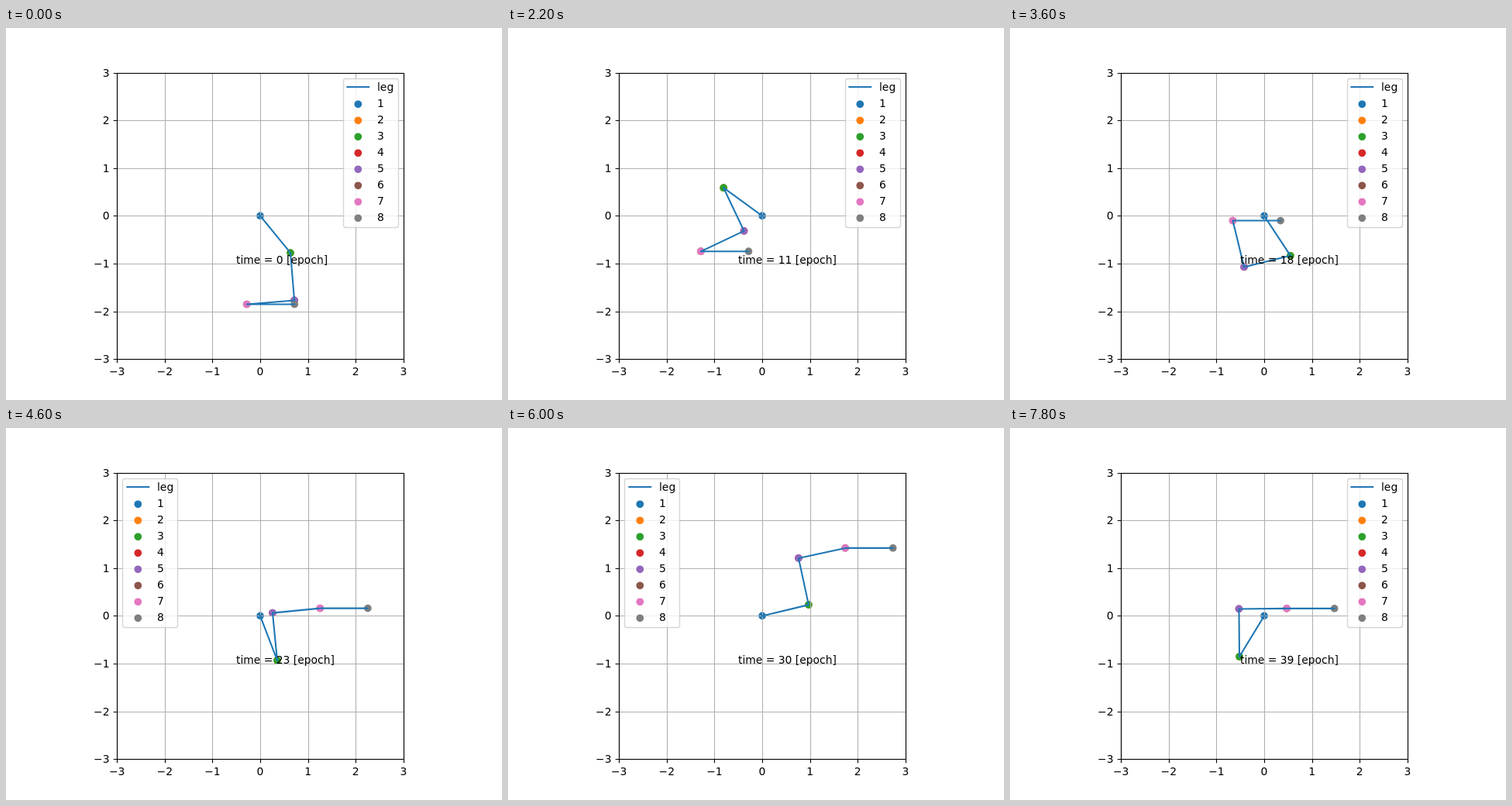
An HTML page for the animation above (8 s loop, 640 by 480 pixels).

```html
<!DOCTYPE html>
<html lang="en">
<head>
<meta charset="utf-8">
<title>Leg</title>
<style>
html, body { margin: 0; width: 100%; height: 100%; overflow: hidden; background: #fff; }
svg { display: block; width: 640px; height: 480px; }
text { font: 13.889px "DejaVu Sans", sans-serif; fill: #000; }
</style>
</head>
<body>
<svg id="stage" viewBox="0 0 640 480"></svg>
<script>
const UNIT = 61.6, CX = 328, CY = 242.4;
const BLUE = '#1f77b4';
const COLORS = [BLUE, '#ff7f0e', '#2ca02c', '#d62728', '#9467bd', '#8c564b', '#e377c2', '#7f7f7f'];
const EPOCH_MS = 200, EPOCHS = 40;

// epoch, angle of link 1, angle of link 2 (degrees)
const POSES = [
  [0, -50.7, -85.3], [3, 60, 60], [6, 40, -30], [7, 156, -7],
  [9, 116, -50], [12, 158, -72], [14, 178.1, -21.8], [18, -56.6, 193.7],
  [20, -75, 315], [23, -69.1, 455.6], [26, -100, 510], [30, 13.4, 462.2],
  [36, -140, 490], [39, -121.3, 450.5]
];

const stage = document.getElementById('stage');

function el(name, attrs, parent = stage, text) {
  const node = document.createElementNS('http://www.w3.org/2000/svg', name);
  for (const key in attrs) node.setAttribute(key, attrs[key]);
  if (text !== undefined) node.textContent = text;
  parent.appendChild(node);
  return node;
}

const px = x => CX + UNIT * x;
const py = y => CY - UNIT * y;
const snap = v => Math.floor(v + 0.5) + 0.5;
const dot = (color, parent, x = 0, y = 0) =>
  el('circle', { cx: x, cy: y, r: 4.86, fill: color }, parent);

const [L, R, T, B] = [px(-3), px(3), py(3), py(-3)].map(snap);
const clip = el('clipPath', { id: 'axes' }, el('defs', {}));
el('rect', { x: L, y: T, width: R - L, height: B - T }, clip);

const dotLayer = el('g', { 'clip-path': 'url(#axes)' });
const dots = COLORS.map(c => dot(c, dotLayer));

// Grid, ticks and tick labels
let grid = '', ticks = '';
for (let v = -3; v <= 3; v++) {
  const x = snap(px(v)), y = snap(py(v));
  const label = String(v).replace('-', '\u2212');
  grid += `M${x} ${T}V${B}M${L} ${y}H${R}`;
  ticks += `M${x} ${B}v4.86M${L} ${y}h-4.86`;
  el('text', { x: px(v), y: 448, 'text-anchor': 'middle' }, stage, label);
  el('text', { x: 133.5, y: Math.round(py(v) + 5), 'text-anchor': 'end' }, stage, label);
}
el('path', { d: grid, stroke: '#b0b0b0', 'stroke-width': 1.11 });
el('path', { d: ticks, stroke: '#000', 'stroke-width': 1.11 });

const legLayer = el('g', { 'clip-path': 'url(#axes)' });
const leg = el('polyline', {
  fill: 'none', stroke: BLUE, 'stroke-width': 2.083,
  'stroke-linejoin': 'round', 'stroke-linecap': 'square'
}, legLayer);
el('rect', {
  x: L, y: T, width: R - L, height: B - T,
  fill: 'none', stroke: '#000', 'stroke-width': 1.11
});
const clock = el('text', { x: 297, y: 304 });

// Legend, laid out for the upper right corner
const frame = el('rect', {
  x: 435.5, y: 65.5, width: 71, height: 192, rx: 2.8,
  fill: '#fff', stroke: '#ccc', 'stroke-width': 1.39, opacity: 0.8
});
const entries = el('g', {});
el('path', {
  d: 'M440.4 76.1H468.2', stroke: BLUE, 'stroke-width': 2.083, 'stroke-linecap': 'square'
}, entries);
el('text', { x: 479, y: 81 }, entries, 'leg');
COLORS.forEach((c, i) => {
  dot(c, entries, 454.3, 98.3 + 21 * i);
  el('text', { x: 479, y: 102 + 21 * i }, entries, i + 1);
});

function joints(epoch) {
  const i = Math.max(1, POSES.findIndex(p => p[0] >= epoch));
  const a = POSES[i - 1], b = POSES[i];
  const k = (epoch - a[0]) / (b[0] - a[0]);
  const mix = n => a[n] + (b[n] - a[n]) * k;
  const points = [[CX, CY]];
  let x = 0, y = 0;
  // The third link is square to the second, the foot stays level.
  for (const deg of [mix(1), mix(2), mix(2) - 90, 0]) {
    x += Math.cos(deg * Math.PI / 180);
    y += Math.sin(deg * Math.PI / 180);
    points.push([px(x), py(y)]);
  }
  return points;
}

// True if the leg runs through the upper right legend area
function blocked(points) {
  return points.slice(1).some(([x, y], i) => {
    const [x0, y0] = points[i];
    for (let k = 0; k <= 1; k += 1 / 32) {
      const u = x0 + (x - x0) * k, v = y0 + (y - y0) * k;
      if (u > 434.5 && u < 506 && v > 64.5 && v < 257.5) return true;
    }
    return false;
  });
}

function draw(epoch) {
  const points = joints(epoch);
  leg.setAttribute('points', points.join(' '));
  dots.forEach((d, i) => {
    const [x, y] = points[Math.ceil(i / 2)];
    d.setAttribute('cx', x);
    d.setAttribute('cy', y);
  });
  clock.textContent = `time = ${epoch} [epoch]`;
  const left = blocked(points);
  frame.setAttribute('transform', `translate(${left ? -285 : 0} 0)`);
  entries.setAttribute('transform', `translate(${left ? -284 : 0} 0)`);
}

function tick() {
  draw(Math.floor(performance.now() / EPOCH_MS) % EPOCHS);
  requestAnimationFrame(tick);
}
tick();
</script>
</body>
</html>
```
